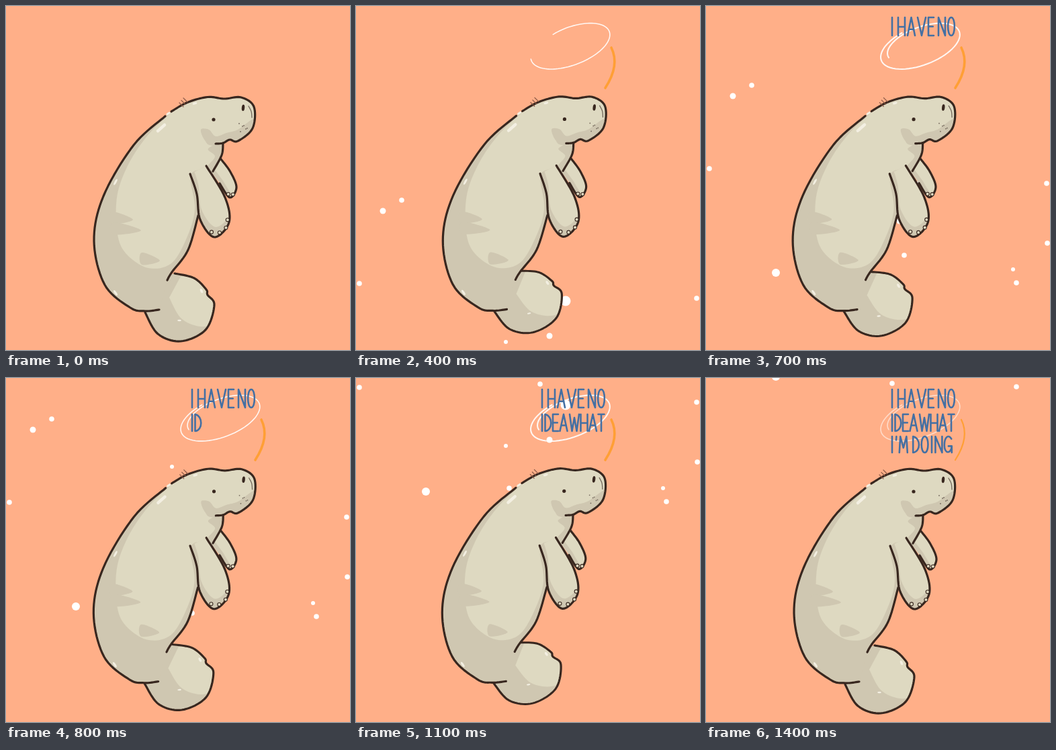
Animation of 512x512 px, one loop 1.5 s. Source, as an HTML page with a canvas:

```html
<!DOCTYPE html>
<html lang="en">
<head>
<meta charset="utf-8">
<title>Puzzled manatee</title>
<style>
html, body { margin: 0; width: 100%; height: 100%; overflow: hidden; background: #ffaf88; }
canvas { display: block; width: 100vw; height: 100vh; }
</style>
</head>
<body>
<canvas width="512" height="512" role="img" aria-label="I have no idea what I'm doing"></canvas>
<script>
const ctx = document.querySelector('canvas').getContext('2d');
const STEP = 100, STEPS = 15, RISE = 57;
const BG = '#ffaf88', LIGHT = '#ded9c1', SHADE = '#cfc7b1', INK = '#38271f',
      SHINE = '#f3efe2', BLUE = '#4470a3', ORANGE = '#ff9f35';

// Catmull-Rom curve through a flat list of coordinates, as a dense polyline.
function curve(flat, closed = false) {
  const pts = [], out = [], count = flat.length / 2;
  for (let i = 0; i < count; i++) pts.push([flat[2 * i], flat[2 * i + 1]]);
  const at = i => pts[closed ? (i + count) % count : Math.max(0, Math.min(count - 1, i))];
  for (let i = 0; i < (closed ? count : count - 1); i++) {
    const [a, b, c, d] = [at(i - 1), at(i), at(i + 1), at(i + 2)];
    for (let u = 0; u < 1; u += 0.1) {
      out.push([0, 1].map(k => b[k] + 0.5 * u * (c[k] - a[k]
        + u * (2 * a[k] - 5 * b[k] + 4 * c[k] - d[k]
        + u * (3 * (b[k] - c[k]) + d[k] - a[k])))));
    }
  }
  if (!closed) out.push(at(count - 1));
  return out;
}

function trace(points) {
  const path = new Path2D();
  points.forEach(p => path.lineTo(...p));
  return path;
}
const line = (...flat) => trace(curve(flat));
const blob = (...flat) => trace(curve(flat, true));

function stroke(path, color = INK, width = 3.2) {
  ctx.strokeStyle = color;
  ctx.lineWidth = width;
  ctx.stroke(path);
}
function fill(path, color) {
  ctx.fillStyle = color;
  ctx.fill(path);
}
function dot(x, y, rx, color, ry = rx, tilt = 0) {
  ctx.beginPath();
  ctx.ellipse(x, y, rx, ry, tilt, 0, 2 * Math.PI);
  ctx.fillStyle = color;
  ctx.fill();
}
function inside(path, draw) {
  ctx.save();
  ctx.clip(path);
  draw();
  ctx.restore();
}

// A limb is an open outline, filled up to a root hidden by the body;
// its lit part is the same shape moved by (dx, dy).
function limb(flat, root, dx, dy) {
  const edge = curve(flat), shape = trace([...edge, root]), outline = trace(edge);
  return () => {
    fill(shape, SHADE);
    inside(shape, () => {
      ctx.translate(dx, dy);
      fill(shape, LIGHT);
    });
    stroke(outline);
  };
}

const tail = limb([207,456, 226,488, 260,499, 297,482, 310,445, 300,430, 298,422, 280,405, 251,398],
  [236,402], 36, -22);
const farFlipper = limb([320,228, 334,247, 343,270, 333,285, 318,264], [303,244], 5, -4);
const flipper = limb([274,250, 284,280, 289,318, 310,344, 332,322, 326,285, 298,238], [286,244], 2, -15);

const edges = [
  [246,157, 270,143.5, 300,135.5, 325,138, 350,136, 369,150, 367,182, 345,201, 333,199, 323,204, 312,205],
  [323,204, 321,222, 308,246],
  [286,312, 271,363, 247,396, 240,408],
  [237,164, 190,207, 145,283, 131,350, 147,415, 185,449, 207,454, 228,452]
].map(flat => curve(flat));
const [head, chest, belly, back] = edges;
const body = trace([...head.slice(0, -11), ...chest, ...belly, ...[...back].reverse()]);
const bodyLines = edges.map(trace);
const bodyLight = blob(236,168, 300,120, 385,130, 380,175, 330,215, 299,240, 275,252, 281,302, 269,345,
  246,383, 212,390, 180,370, 166,340, 165,285, 180,240, 205,200);
const jaw = blob(290,184, 302,184, 312,194, 328,189, 345,184, 372,168, 372,205, 310,208, 296,200);
const neck = blob(301,212, 330,203, 322,240, 300,240, 311,224);
const fold = (x, y, reach) => blob(x - 10, y - 12, x + reach, y, x - 10, y + 6);
const folds = [fold(167, 318, 22), fold(170, 334, 31), fold(212, 379, 17)];

// Start position and radius.
const bubbles = [[40,533,4.5], [68,517], [5,641], [312,667,7.5], [507,663], [508,752], [295,770], [228,791],
  [104,796,6], [457,791,3], [462,811], [274,636], [247,588,3], [288,719,4.5], [223,728,3], [277,806]];

const pointer = new Path2D('M380 62Q393 88 371 122');

// Hand lettering: width and strokes inside a unit box.
const glyphs = {
  I: [4, 'M.5 0V1'], "'": [2, 'M.5 0L.3 .22'],
  H: [10, 'M0 0V1M1 0V1M0 .52H1'], A: [11, 'M0 1L.5 0L1 1M.18 .66H.85'],
  V: [12, 'M0 0L.5 1L1 0'], E: [8, 'M1 0H0V1H1M0 .5H.85'],
  N: [10, 'M0 1V0L1 1V0'], O: [10, 'M.5 0C1.15 0 1.15 1 .5 1S-.15 0 .5 0'],
  D: [9, 'M0 0V1C1.3 .95 1.3 .1 0 0'], W: [14, 'M0 0L.25 1L.5 .2L.75 1L1 0'],
  T: [9, 'M0 0H1M.5 0V1'], M: [12, 'M0 1L.12 0L.5 .7L.88 0L1 1'],
  G: [11, 'M.95 .15C.6 -.15 0 0 0 .55C0 1.1 .9 1.1 1 .6H.55M1 .6V1']
};
const rows = [
  { text: 'I HAVE NO', y: 17, height: 27, gap: 4, space: 3 },
  { text: 'IDEA WHAT', y: 54, height: 25, gap: 2.5, space: 1 },
  { text: "I'M DOING", y: 87, height: 24, gap: 3.4, space: 5 }
];

// Two upward swings of the tail per loop, at rest at both ends.
const swing = n => (10 - 5.5 * Math.cos((n - 2) * Math.PI / 3)) * Math.sin(n * Math.PI / 14) ** 0.4;
// Alternating redraw wobble shared by the body and the ring.
const wobble = n => Math.sin(n * Math.PI / 2);

function drawTail(lift) {
  ctx.save();
  ctx.translate(215 - lift * 0.2, 425);
  ctx.rotate(-lift * 0.75 * Math.PI / 180);
  ctx.scale(1, 1 - lift * 0.006);
  ctx.translate(-215, -425);
  tail();
  dot(291, 424, 1.8, SHINE, 3.5, -0.4);
  dot(258, 468, 2.8, SHINE, 1.2);
  ctx.restore();
}

function drawNails(x, y, radius, count) {
  for (let i = 0; i < count; i++) {
    const angle = 2 - i * 0.72;
    const px = x + radius * Math.cos(angle), py = y + radius * Math.sin(angle);
    dot(px, py, 3.1, INK);
    dot(px, py, 2, LIGHT);
  }
}

function drawFace() {
  dot(309, 169, 2.6, INK);
  dot(353, 151.5, 2.2, INK, 4.8, 0.1);
  stroke(line(361,149, 365,157, 366,166), '#71665a', 1.3);
  for (let i = 0; i < 6; i++) dot(347 + i * 5 % 13, 175 + i * 4 % 13, 0.9, '#766b5e');
}

function drawShine() {
  stroke(line(226,186, 236,177), SHINE, 4.5);
  stroke(line(240,161, 243,159), SHINE, 3);
  dot(163, 262, 1.5, SHINE, 5, 0.5);
  dot(163, 427, 1.7, SHINE, 4.5, -0.6);
  dot(281, 145, 3.5, SHINE, 1.6, -0.3);
}

function drawManatee(n) {
  const lift = swing(n), lean = -0.0015 * lift;
  ctx.save();
  ctx.transform(1, 0, lean, 1, 0.8 * wobble(n) - lean * 250, -lift * 0.05);
  drawTail(lift);
  farFlipper();
  drawNails(335, 271, 10, 2);

  fill(body, SHADE);
  inside(body, () => {
    fill(bodyLight, LIGHT);
    [jaw, neck, ...folds].forEach(path => fill(path, SHADE));
  });
  bodyLines.forEach(path => stroke(path));
  flipper();
  drawNails(313, 321, 17, 4);

  for (let i = 0; i < 3; i++) stroke(line(258 + 3 * i, 144 - 3.5 * i, 264 + 3 * i, 150 - 3.5 * i), '#8a5947', 1.2);
  drawShine();
  drawFace();
  ctx.restore();
}

// Point on the tilted spiral ring; u runs from its outer to its inner end.
function ringPoint(u) {
  const angle = (252 - 432 * u) * Math.PI / 180, tilt = -0.36, size = 1 - 0.19 * u ** 4;
  const x = 62.6 * size * Math.cos(angle), y = 29 * size * Math.sin(angle);
  return [319.5 + x * Math.cos(tilt) - y * Math.sin(tilt), 59 + x * Math.sin(tilt) + y * Math.cos(tilt)];
}

function drawBalloon(n) {
  if (n < 2) return;
  const fading = n === STEPS - 1;
  stroke(pointer, ORANGE, n < 4 || fading ? 2.2 : 3.6);
  // The ring grows both ways from its lower right.
  const grown = Math.min(1, 0.012 + (n - 2) / 3), from = 0.49 * (1 - grown), to = 0.49 + 0.51 * grown;
  const points = Array.from({ length: 81 }, (_, i) => ringPoint(from + (to - from) * i / 80));
  ctx.globalAlpha = fading ? 0.55 : 0.9;
  stroke(trace(points), '#fff', 1.6 - 0.45 * wobble(n));
  ctx.globalAlpha = 1;
}

function drawText(n) {
  let left = n < 6 ? 0 : Math.floor(5 + (n - 6) * 17 / 8);
  const path = new Path2D();
  for (const { text, y, height, gap, space } of rows) {
    let x = 275;
    for (const char of text) {
      if (char === ' ') { x += space; continue; }
      if (left <= 0) break;
      const [width, d] = glyphs[char];
      path.addPath(new Path2D(d), { a: width, b: 0, c: 0, d: height, e: x, f: y });
      x += width + gap;
      if (char !== "'") left--;
    }
  }
  stroke(path, BLUE, 2.6);
}

function render(now) {
  const n = Math.floor(now / STEP) % STEPS;
  ctx.fillStyle = BG;
  ctx.fillRect(0, 0, 512, 512);
  ctx.lineCap = ctx.lineJoin = 'round';
  bubbles.forEach(([x, y, r = 3.8]) => dot(x, y - RISE * n, r, '#fff'));
  drawManatee(n);
  drawBalloon(n);
  drawText(n);
}

const begin = performance.now();
function tick() {
  render(performance.now() - begin);
  requestAnimationFrame(tick);
}
tick();
</script>
</body>
</html>
```
